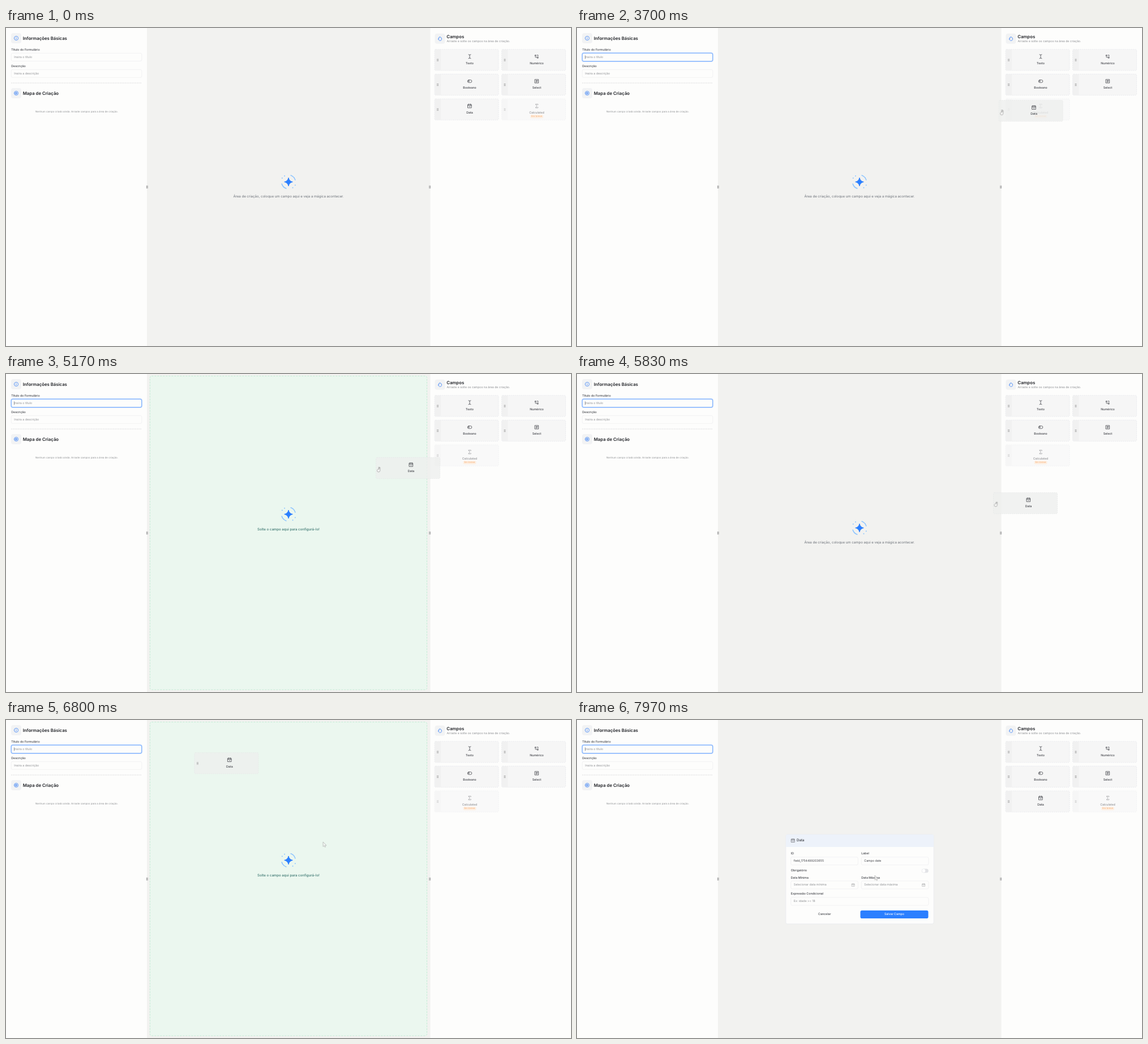
An HTML page that plays this animation: 998 px wide and 561 px high, repeating every 8000 ms.

```html
<!DOCTYPE html>
<html lang="pt-BR">
<head>
<meta charset="utf-8">
<title>Editor de formulário</title>
<style>
html, body { margin: 0; width: 100%; height: 100%; overflow: hidden; background: #fdfdfc; }
svg { display: block; width: 998px; height: 561px; }
text { font-family: Inter, sans-serif; font-size: 5.25px; fill: #3a3c42; dominant-baseline: central; text-rendering: geometricPrecision; }
.title { font-size: 7.75px; font-weight: 600; fill: #1f2126; }
.label { font-weight: 500; }
.muted { fill: #8b8d91; }
.mid { text-anchor: middle; }
.icon { fill: none; stroke: #3c3e44; stroke-width: .75; stroke-linecap: round; stroke-linejoin: round; }
.blue { stroke: #3b82f6; }
.field { fill: #fdfdfc; stroke: #e9eaec; stroke-width: .6; }
.panel { fill: #f6f6f6; stroke: #e2e4ea; stroke-width: .7; stroke-dasharray: 2 1.5; }
.strip { fill: #f1f1f1; }
.cursor path { fill: #f4f4f3; stroke: #8a8a8a; stroke-width: .6; stroke-linejoin: round; }
#drag .panel { fill: #eeefee; fill-opacity: .8; stroke: #e4e6e6; }
#drag .strip { fill: none; }

/* One shared 8 s clock: 1% is 80 ms */
.anim { animation: 8s linear infinite; }
.step { animation-timing-function: step-end; }
#drag { animation-name: drag; }
#dragged { animation-name: dragged; }
#slot { animation-name: slot; }
#calc { animation-name: calc; }
#idle { animation-name: idle; }
#drop { animation-name: drop; }
#focus { animation-name: focus; }
#dialog { animation-name: dialog; }
#pointer { animation-name: pointer; }
#arrow { animation-name: arrow; }
#open { animation-name: open; }
#grab { animation-name: dragging; }

@keyframes drag {
  0%, 43.75% { transform: translate(757px, 125px); animation-timing-function: ease-in-out; }
  54.4% { transform: translate(653.5px, 147.3px); }
  65% { transform: translate(653.5px, 147.3px); animation-timing-function: ease-in-out; }
  69.5% { transform: translate(750px, 198px); animation-timing-function: ease-in-out; }
  72.9% { transform: translate(735.5px, 209.3px); animation-timing-function: ease-in-out; }
  83.7% { transform: translate(555px, 197px); animation-timing-function: ease; }
  86.84%, 100% { transform: translate(241px, 0); }
}
@keyframes pointer {
  0% { transform: translate(600px, 330px); animation-timing-function: ease-in-out; }
  10.5% { transform: translate(768px, 150px); animation-timing-function: ease-out; }
  17% { transform: translate(761px, 137px); }
  30% { transform: translate(761px, 137px); animation-timing-function: ease-in-out; }
  40%, 43.75% { transform: translate(762px, 147px); animation-timing-function: ease-in-out; }
  54.4% { transform: translate(658px, 169px); }
  65% { transform: translate(658px, 169px); animation-timing-function: ease-in-out; }
  69.5% { transform: translate(755px, 219px); animation-timing-function: ease-in-out; }
  72.9% { transform: translate(739.5px, 230px); animation-timing-function: ease-in-out; }
  83.7%, 85.5% { transform: translate(560px, 219px); animation-timing-function: ease-in-out; }
  97%, 100% { transform: translate(526px, 278px); }
}
@keyframes dragged { 0%, 86.84%, 100% { visibility: hidden; } 43.75% { visibility: visible; } }
@keyframes dragging { 0%, 83.7%, 100% { visibility: hidden; } 43.75% { visibility: visible; } }
@keyframes slot { 0%, 86.84%, 100% { visibility: visible; } 43.75% { visibility: hidden; } }
@keyframes calc { 0%, 86.84%, 100% { transform: none; } 43.75% { transform: translateX(-118.5px); } }
@keyframes focus { 0% { visibility: hidden; } 43.75%, 100% { visibility: visible; } }
@keyframes drop {
  0%, 66.9%, 86.84%, 100% { visibility: hidden; }
  50%, 76.2% { visibility: visible; }
}
@keyframes idle {
  0%, 66.9% { visibility: visible; }
  50%, 76.2%, 100% { visibility: hidden; }
}
@keyframes dialog { 0%, 86.84% { opacity: 0; } 88.8%, 100% { opacity: 1; } }
@keyframes arrow { 0%, 10.5% { visibility: hidden; } .375%, 83.7%, 100% { visibility: visible; } }
@keyframes open { 0%, 43.75%, 100% { visibility: hidden; } 10.5% { visibility: visible; } }
</style>
</head>
<body>
<svg id="stage" viewBox="0 0 998 561" xmlns="http://www.w3.org/2000/svg"></svg>
<script>
const at = (x, y, body, attrs = '') => `<g transform="translate(${x} ${y})" ${attrs}>${body}</g>`;
const text = (x, y, value, cls = '', attrs = '') => `<text x="${x}" y="${y}" class="${cls}" ${attrs}>${value}</text>`;
const rect = (x, y, w, h, attrs) => `<rect x="${x}" y="${y}" width="${w}" height="${h}" ${attrs}/>`;
const icon = (d, cls = '', scale = 1) => `<path class="icon ${cls}" d="${d}" transform="scale(${scale})"/>`;
const field = (x, y, w, value, cls = 'muted') =>
  rect(x, y, w, 14, 'rx="2.5" class="field"') + text(x + 5, y + 7.2, value, cls);

const icons = {
  text: 'M-2 -3.5Q0 -3.5 0 -2.3Q0 -3.5 2 -3.5M0 -2.3V2.3M-2 3.5Q0 3.5 0 2.3Q0 3.5 2 3.5',
  number: 'M-2.8 -2.6H-1.2V-.6H-2.8ZM.8 -2.6H2.2V-.6M-2.6 1.4H-.4M1 .9H2.6V2.8H1Z',
  toggle: 'M-1.5 -2.3H1.5A2.3 2.3 0 0 1 1.5 2.3H-1.5A2.3 2.3 0 0 1 -1.5 -2.3ZM-1.5 -.9A.9 .9 0 1 1 -1.6 -.9',
  select: 'M-3.1 -3.1H3.1V3.1H-3.1ZM-1.4 -1.3H1.4M-1.4 0H1.4M-1.4 1.3H.5',
  date: 'M-3.1 -2.7H3.1V3.3H-3.1ZM-3.1 -.7H3.1M-1.5 -3.6V-2M1.5 -3.6V-2M-.5 1.3H.5',
  sum: 'M2.2 -2.2V-3.2H-2.2L.4 0L-2.2 3.2H2.2V2.2',
  info: 'M-3.6 0A3.6 3.6 0 1 1 3.6 0A3.6 3.6 0 1 1 -3.6 0M0 -1.6V-1.4M0 0V1.6',
  map: 'M-3.6 0A3.6 3.6 0 1 1 3.6 0A3.6 3.6 0 1 1 -3.6 0M-1.4 -1.4H1.4V1.4H-1.4ZM0 -1.4V1.4',
  hand: 'M-2.2 .6V-1.7Q-1.5 -2.7 -.9 -1.7V-2.8Q-.2 -3.7 .5 -2.8V-2.2Q1.2 -3 1.8 -2V-1Q2.5 -1.8 3 -.8V1.2Q2.6 3.6 .4 3.6Q-1.4 3.6 -2.3 2.2L-3.4 .8Q-3.1 -.1 -2.2 .6',
};

const heading = (x, y, name, title, titleY) =>
  rect(x, y - 9, 18, 18, 'rx="4" fill="#f2f3f4"') + at(x + 9, y, icon(icons[name], 'blue')) +
  text(x + 20.7, titleY, title, 'title');

const grip = (x, y) => at(x, y, '<path d="M-.8 -2V2.2M.8 -2V2.2" stroke="#777" stroke-width=".9" stroke-dasharray=".9 .7"/>');

const card = (name, label) =>
  rect(0, 0, 113, 37.3, 'rx="2" class="panel"') +
  rect(.5, .5, 10.5, 36.3, 'class="strip"') + grip(5.5, 18.8) +
  at(62, 12.6, icon(icons[name])) + text(62, 24.9, label, 'label mid');

const sparkle = y => at(499, y, `
  <path d="M0 -7.3Q1.2 -1.2 7.3 0Q1.2 1.2 0 7.3Q-1.2 1.2 -7.3 0Q-1.2 -1.2 0 -7.3Z"
    fill="#2b7fff" stroke="#2b7fff" stroke-linejoin="round"/>
  <path d="M4.2 -11.6A12.3 12.3 0 0 1 11.8 -3.5M-4.2 11.6A12.3 12.3 0 0 1 -11.8 3.5"
    fill="none" stroke="#8ec5ff" stroke-width="1.6" stroke-linecap="round"/>
  <g fill="#8ec5ff">${[[-11.2, -6.8], [-7, -10.6], [11.8, 5.8], [7.5, 10.3]]
    .map(([x, dy]) => `<circle cx="${x}" cy="${dy}" r="1"/>`).join('')}</g>`);

const handle = x => rect(x - 1.7, 277.5, 3.4, 6, 'rx="1" fill="#dedede"') + grip(x, 280.5);

const leftPanel =
  heading(9, 18, 'info', 'Informações Básicas', 17.8) +
  text(9.3, 38.8, 'Título do Formulário', 'label') + field(9.3, 44.4, 230.5, 'Insira o título') +
  `<g id="focus" class="anim step">
    ${rect(9, 44, 231, 15, 'rx="3" fill="none" stroke="#c9deff" stroke-width="1.8"')}
    ${rect(9.3, 44.3, 230.4, 14.4, 'rx="2.6" fill="none" stroke="#5f9dfc" stroke-width=".8"')}
    ${rect(14, 48.5, .6, 6, 'fill="#555"')}
  </g>` +
  text(9.3, 67.7, 'Descrição', 'label') + field(9.3, 73.3, 230.5, 'Insira a descrição') +
  '<path d="M9 97H240" stroke="#d5d5d5" stroke-width=".8" stroke-dasharray="2 1"/>' +
  heading(9, 115, 'map', 'Mapa de Criação', 115) +
  text(125, 148.7, 'Nenhum campo criado ainda. Arraste campos para a área de criação.', 'muted mid', 'style="font-size:4.46px"');

const canvas =
  rect(249, 0, 500.5, 561, 'fill="#f2f2f0"') +
  `<g id="idle" class="anim step">${sparkle(271.5)}
    ${text(499, 297.6, 'Área de criação, coloque um campo aqui e veja a mágica acontecer.', 'mid',
      'style="font-size:6.05px;fill:#6b7078"')}</g>
  <g id="drop" class="anim step">
    ${rect(254.3, 3.6, 489.2, 553.4, 'rx="3" fill="#ebf7ef" stroke="#bdebd2" stroke-width=".9" stroke-dasharray="3 2"')}
    ${sparkle(247.4)}
    ${text(499, 274.2, 'Solte o campo aqui para configurá-lo!', 'mid label', 'style="font-size:6.1px;fill:#39756f"')}
  </g>` + handle(249.3) + handle(748.6);

const rightPanel =
  heading(757.5, 18.7, 'hand', 'Campos', 15) +
  text(778.4, 24.2, 'Arraste e solte os campos na área de criação.', 'muted', 'style="font-size:5.18px"') +
  at(757, 37.7, card('text', 'Texto')) + at(875.5, 37.7, card('number', 'Numérico')) +
  at(757, 81.3, card('toggle', 'Booleano')) + at(875.5, 81.3, card('select', 'Select')) +
  `<g id="slot" class="anim step">${at(757, 125, card('date', 'Data'))}</g>
  <g id="calc" class="anim step">${at(875.5, 125,
    `<g opacity=".55">${card('sum', 'Calculated')}</g>` +
    rect(50.5, 28, 23, 6.3, 'rx="2" fill="#fdf0e4"') +
    text(62, 31.2, 'Em breve', 'mid', 'style="font-size:4.3px;fill:#f9a869"'))}</g>`;

const dateField = (x, value) =>
  field(x, 284, 118.6, value) + at(x + 110, 291, icon(icons.date, '', .75), 'opacity=".45"');

const dialog = `<g id="dialog" class="anim">
  ${rect(368.8, 202, 261.4, 157.7, 'rx="3" fill="#fdfdfc" stroke="#e5e8ed" stroke-width=".7"')}
  <path d="M369 224V205Q369 202 372 202H627Q630 202 630 205V224Z" fill="#edf2fa"/>
  ${at(381.5, 212.6, icon(icons.date, '', .9), 'opacity=".8"')}
  ${text(388, 212.8, 'Data', 'label', 'style="font-size:6.2px"')}
  ${text(377.8, 236.3, 'ID', 'label')}${field(377.8, 241.8, 118.6, 'field_1754499203655', '')}
  ${text(502.3, 236.3, 'Label', 'label')}${field(502.3, 241.8, 118.6, 'Campo date', '')}
  ${text(377.8, 265.8, 'Obrigatório', 'label')}
  ${rect(608.8, 262.4, 12, 7, 'rx="3.5" fill="#e2e3e6"')}<circle cx="612.4" cy="265.9" r="2.9" fill="#fff"/>
  ${text(377.8, 278.5, 'Data Mínima', 'label')}${dateField(377.8, 'Selecionar data mínima')}
  ${text(502.3, 278.5, 'Data Máxima', 'label')}${dateField(502.3, 'Selecionar data máxima')}
  ${text(377.8, 307.3, 'Expressão Condicional', 'label')}${field(377.8, 313, 243.1, 'Ex: idade &gt;= 18')}
  ${text(437.3, 343.2, 'Cancelar', 'label mid')}
  ${rect(500.5, 336, 120, 14, 'rx="2.8" fill="#2b7fff"')}
  ${text(560.5, 343.2, 'Salvar Campo', 'label mid', 'style="fill:#fff"')}
</g>`;

const dragged = `<g id="dragged" class="anim step"><g id="drag" class="anim">${card('date', 'Data')}</g></g>`;

const pointer = `<g id="pointer" class="anim cursor">
  <g id="arrow" class="anim step" opacity=".75"><path d="M0 -4V4.4L2 2.7L3.3 5.4L4.6 4.8L3.4 2.2H6Z"/></g>
  <g id="open" class="anim step"><path transform="scale(.95)" d="${icons.hand}Z"/></g>
  <g id="grab" class="anim step"><path d="M-2.6 .4L-1.5 -.8Q-.8 -1.5 0 -.8L1.2 -1.5V-4Q2 -4.8 2.8 -4V1.4Q2.4 4 0 4Q-2.8 4 -2.6 .4Z"/></g>
</g>`;

document.getElementById('stage').innerHTML = leftPanel + canvas + rightPanel + dialog + dragged + pointer;
</script>
</body>
</html>
```
